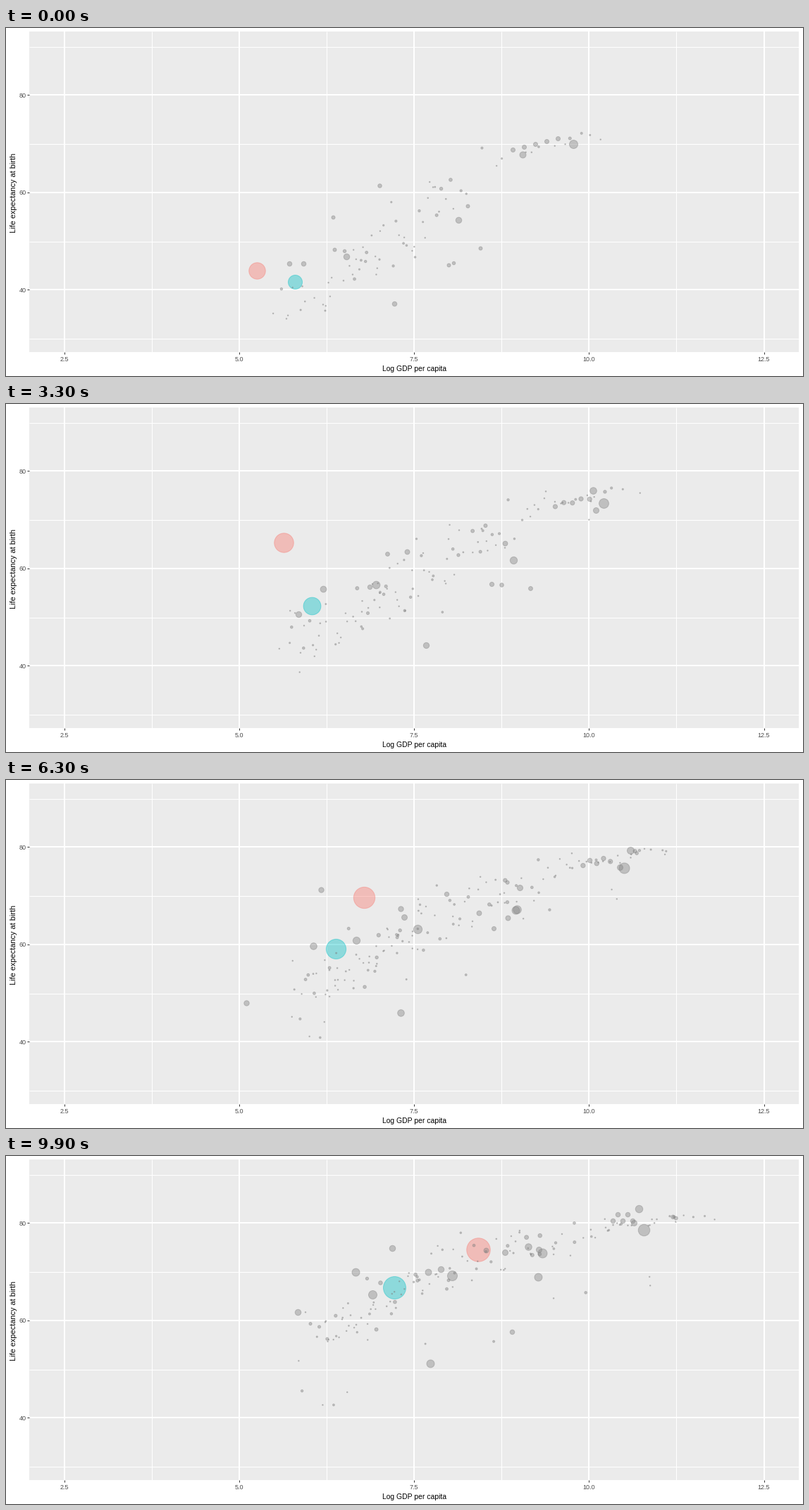
Animation of 1131 by 495 pixels, one loop 10000 ms. Source, as a matplotlib script:

```python
import numpy as np
import matplotlib.pyplot as plt
from matplotlib.animation import FuncAnimation
from matplotlib.colors import to_rgba
from matplotlib.patches import Rectangle

W, H, DPI = 1131, 495, 72
STEPS = np.arange(51)              # one step per year
T = STEPS / 50
KEYS = [0, 17, 32, 50]             # years with known positions
GREY, RED, TEAL = "#7F7F7F", "#F8766D", "#00BFC4"
rng = np.random.default_rng(11)

paths, sizes, colors = [], [], []


def add_path(x, y, d, birth=0, color=GREY):
    alive = STEPS >= birth
    paths.append(np.where(alive[:, None], np.column_stack([x, y]) + 0.5, np.nan))
    sizes.append(d ** 2)
    colors.append(color)


def track(d0, d1, *pts, keys=None, color=GREY):
    """Dot through key points; a short track enters at a later key."""
    keys = keys or KEYS[-len(pts):]
    x, y = np.transpose(pts)
    d = d0 + (d1 - d0) * T ** 0.85
    add_path(np.interp(STEPS, keys, x), np.interp(STEPS, keys, y), d, keys[0], color)


# The two highlighted countries; the red one first falls back
track(23.5, 33.5, (356, 345), (319, 340), (355, 313), (346, 261), (394, 197),
      (447, 176), (508, 167), (601, 148), (670, 133),
      keys=[0, 2, 5, 8, 17, 24, 32, 43, 50], color=RED)
track(20, 32, (410, 361), (421, 327), (434, 287), (468, 240), (513, 208), (551, 187),
      keys=[0, 8, 17, 32, 43, 50], color=TEAL)

# The other large populations
track(12, 16.5, (805, 165), (848, 141), (877, 125), (905, 105))
track(9, 10.5, (733, 180), (833, 123), (886, 100), (898, 75))
track(8.5, 13, (642, 273), (720, 222), (725, 184), (761, 138))
track(11, 11, (723, 185), (755, 172))
track(5, 9.5, (655, 253), (708, 198), (729, 153), (741, 129))
track(8.5, 14, (483, 325), (525, 257), (584, 212), (633, 170))
track(6.5, 12, (422, 335), (450, 263), (497, 228), (520, 197))
track(6.5, 11, (402, 335), (415, 299), (436, 236), (496, 165))
track(6.5, 11, (551, 392), (596, 343), (560, 331), (602, 295))
track(5, 8.5, (341, 317), (414, 222))
track(5, 8.5, (447, 156), (548, 131))
track(5.5, 9, (530, 224), (569, 210), (565, 195), (599, 165))
track(5, 8.5, (466, 315), (516, 260), (560, 183), (617, 161))
track(5, 7, (464, 269), (541, 213), (625, 162), (681, 134))
track(5, 8, (628, 337), (689, 256), (712, 196), (756, 133))
track(4.5, 8, (635, 334), (744, 262), (671, 189), (708, 137))
track(5, 6.5, (673, 313), (703, 257), (692, 211), (718, 250))
track(8, 8, (837, 151), (871, 124), (891, 95))

# A few wealthy mid-sized countries that draw together
for lag in range(5):
    x0, y0 = 783 - 16 * lag, 157 + 4 * lag
    x1, y1 = 889 - 7 * lag, 92 - 9 * (lag % 2)
    ease = T ** 0.8
    add_path(x0 + (x1 - x0) * ease, y0 + (y1 - y0) * T, 6 + 0.5 * T)


def first_trend(x):
    return np.interp(x, [390, 500, 570, 640, 700, 820], [392, 352, 290, 225, 180, 150])


def last_trend(x):
    return np.interp(x, [400, 480, 560, 620, 700, 800, 900, 1000],
                     [265, 240, 200, 160, 140, 115, 90, 84])


def crowd(count, early):
    """Small countries spread along a trend that rises over the years."""
    ranks = (np.arange(count) + rng.random(count)) / count
    quarters = np.linspace(0, 1, 5)
    for rank in ranks:
        x0 = np.interp(rank, quarters, [370, 470, 540, 645, 845])
        x1 = np.interp(rank, quarters, [430, 525, 640, 785, 985]) + rng.normal(0, 10)
        spread = np.interp(x0, [400, 560, 680, 800], [25, 26, 13, 6])
        offset = spread * rng.normal()
        lag = 90 * T * (rng.random() < 0.07)
        sway = np.sin(np.pi * T * rng.uniform(1, 3))
        x = x0 + (x1 - x0) * T + 9 * rng.normal() * sway
        y = first_trend(x0) * (1 - T) + last_trend(x1) * T
        y += offset * (1 - 0.3 * T) + lag - 10 * np.sin(np.pi * T)
        d = 1.5 + 4 * rng.random() ** 4 * (0.8 + 0.3 * T)
        birth = 0 if rng.random() < early else rng.integers(1, 33)
        add_path(x, y, d, birth)


crowd(count=140, early=0.45)

paths = np.stack(paths, axis=1)
sizes = np.stack(sizes, axis=1)

# Stage in pixel units, y downwards
fig = plt.figure(figsize=(W / DPI, H / DPI), dpi=DPI, facecolor="white")
ax = fig.add_axes([0, 0, 1, 1])
ax.set(xlim=(0, W), ylim=(H, 0))
ax.axis("off")

LEFT, RIGHT, TOP, BOTTOM = 33, 1125, 5, 461
ax.add_patch(Rectangle((LEFT, TOP), RIGHT - LEFT, BOTTOM - TOP, fc="#EBEBEB", lw=0, zorder=0))
grid_x = 82.6 + 124.12 * np.arange(9)
grid_y = 26.9 + 69.2 * np.arange(7)
major_x, minor_x = grid_x[::2], grid_x[1::2]
major_y, minor_y = grid_y[1::2] - 0.8, grid_y[::2]
for xs, ys, width in ((minor_x, minor_y, 1), (major_x, major_y, 2)):
    ax.vlines(xs, TOP, BOTTOM, color="white", lw=width, zorder=1)
    ax.hlines(ys, LEFT, RIGHT, color="white", lw=width, zorder=1)
ax.vlines(major_x, BOTTOM, BOTTOM + 3, color="#333333", lw=1, zorder=1)
ax.hlines(major_y, LEFT - 3, LEFT, color="#333333", lw=1, zorder=1)


def label(x, y, text, size, color="#4D4D4D", ha="center", **kw):
    ax.text(x, y, text, fontsize=size, color=color, ha=ha, family="Liberation Sans", **kw)


for i, x in enumerate(major_x, 1):
    label(x, 474.5, f"{2.5 * i:.1f}", 9)
for i, y in enumerate(major_y):
    label(28.5, y + 3.7, str(80 - 20 * i), 9, ha="right")
label(579, 488, "Log GDP per capita", 10.4, "black")
label(11.5, 234, "Life expectancy at birth", 10.9, "black", va="center", rotation=90)

rgba = [to_rgba(c, 0.4) for c in colors]
dots = ax.scatter(*paths[-1].T, s=sizes[-1], c=rgba, edgecolors=rgba,
                  linewidths=1, zorder=2, plotnonfinite=True)


def draw(frame):
    step = (frame + 1) // 2
    dots.set_offsets(np.ma.masked_invalid(paths[step]))
    dots.set_sizes(sizes[step])
    return [dots]


anim = FuncAnimation(fig, draw, frames=100, interval=100, repeat=True)
plt.show()
```
